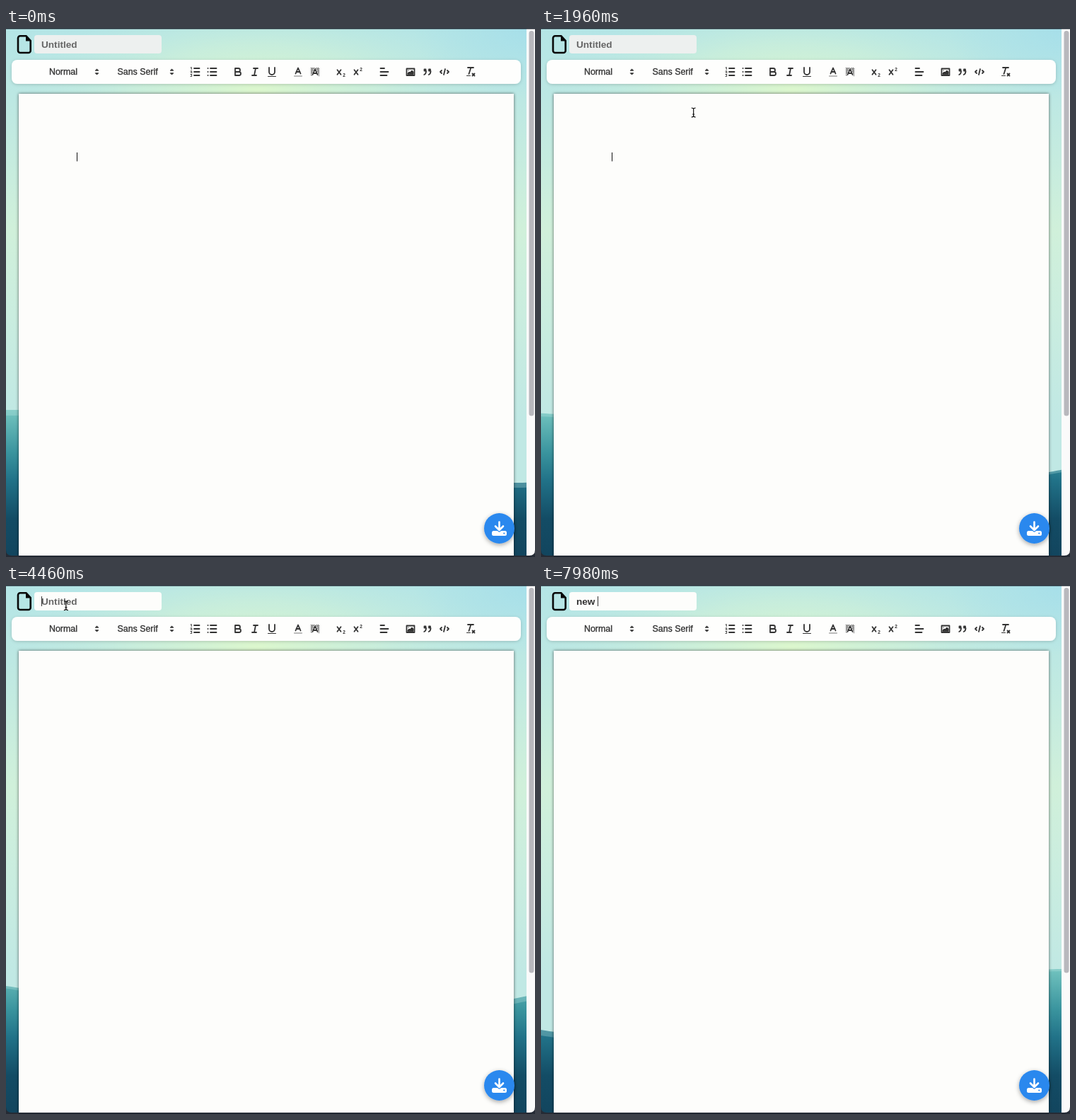
An HTML page that plays this animation: 748x748 px, repeating every 8 s.

```html
<!DOCTYPE html>
<html lang="en">
<head>
<meta charset="utf-8">
<title>Document editor</title>
<style>
  html, body { margin: 0; width: 100%; height: 100%; overflow: hidden; }
  svg { display: block; width: 100vw; height: 100vh; }
  text { font-family: "Liberation Sans", Arial, sans-serif; white-space: pre; }
  .icon { fill: none; stroke: #333; stroke-width: 1.8; stroke-linecap: round; stroke-linejoin: round; }
  .solid { fill: #333; }
  .thin { stroke-width: 1; }
  .label { font-size: 12.4px; fill: #333; stroke: #333; stroke-width: .35; }
  .small { font-size: 6.5px; font-weight: bold; fill: #333; stroke: none; }
  #title { font-size: 13.6px; font-weight: bold; }
</style>
</head>
<body>
<svg viewBox="0 0 748 748">
  <defs>
    <linearGradient id="sky" x2="0" y2="1">
      <stop offset="0" stop-color="#b4e5e6"/>
      <stop offset=".14" stop-color="#bde8e3"/>
      <stop offset=".38" stop-color="#d0f0da"/>
      <stop offset=".54" stop-color="#caeddf"/>
      <stop offset=".74" stop-color="#c0e8e4"/>
    </linearGradient>
    <radialGradient id="glow">
      <stop offset="0" stop-color="#dcf7cd"/>
      <stop offset=".5" stop-color="#d2f2d6" stop-opacity=".6"/>
      <stop offset="1" stop-color="#c0eae0" stop-opacity="0"/>
    </radialGradient>
    <radialGradient id="corner">
      <stop offset="0" stop-color="#a6dfea"/>
      <stop offset="1" stop-color="#a9e0e8" stop-opacity="0"/>
    </radialGradient>
    <linearGradient id="sea" gradientUnits="userSpaceOnUse" x1="0" y1="540" x2="0" y2="748">
      <stop offset="0" stop-color="#74c5c0"/>
      <stop offset=".29" stop-color="#3a949e"/>
      <stop offset=".48" stop-color="#217288"/>
      <stop offset=".74" stop-color="#134c65"/>
      <stop offset="1" stop-color="#12455e"/>
    </linearGradient>
    <pattern id="hatch" width="2" height="2" patternUnits="userSpaceOnUse">
      <path d="M0 0h1v1H0zM1 1h1v1H1z" fill="#333"/>
    </pattern>
    <filter id="pageShadow" x="-5%" y="-5%" width="110%" height="110%">
      <feDropShadow dx="0" dy="0" stdDeviation="2" flood-opacity=".6"/>
    </filter>
    <filter id="softShadow" x="-30%" y="-30%" width="160%" height="170%">
      <feDropShadow dx="0" dy="1" stdDeviation="2" flood-opacity=".18"/>
    </filter>
    <filter id="buttonShadow" x="-40%" y="-40%" width="180%" height="180%">
      <feDropShadow dx="0" dy="2" stdDeviation="3" flood-opacity=".35"/>
    </filter>
  </defs>

  <rect width="748" height="748" fill="url(#sky)"/>
  <ellipse cx="355" cy="88" rx="340" ry="130" fill="url(#glow)"/>
  <ellipse cx="745" cy="0" rx="170" ry="100" fill="url(#corner)"/>
  <g id="waves" fill="url(#sea)"></g>

  <rect x="18" y="93" width="700" height="680" fill="#fdfdfb" filter="url(#pageShadow)"/>
  <path id="pageCaret" d="M100.5 176v12.5" stroke="#111"/>

  <path d="M20 11.3h8.5l6.2 6.7v14a3 3 0 0 1-3 3H20a3 3 0 0 1-3-3V14.3a3 3 0 0 1 3-3z" fill="none" stroke="#080808" stroke-width="2.6"/>
  <path d="M28 11v7.5h7z" fill="#080808"/>
  <rect id="field" x="40" y="10" width="180" height="26" rx="4"/>
  <text id="title" x="50" y="27.5"></text>
  <path id="titleCaret" d="M0 16v14" stroke="#333"/>

  <rect x="8" y="45" width="720" height="34" rx="8" fill="#fefefd" filter="url(#softShadow)"/>
  <text class="label" x="61" y="66.3">Normal</text>
  <text class="label" x="157.5" y="66.3">Sans Serif</text>
  <g id="toolbar"></g>

  <circle cx="697.5" cy="707.5" r="21.5" fill="#2b88ee" filter="url(#buttonShadow)"/>
  <rect x="687" y="711" width="21" height="7" rx="2.5" fill="#fff"/>
  <g fill="none" stroke-linecap="round" stroke-linejoin="round">
    <path d="M697.5 698.5v11m-5.5-5 5.5 5.5 5.5-5.5" stroke="#2b88ee" stroke-width="5"/>
    <path d="M697.5 698.5v11m-5.5-5 5.5 5.5 5.5-5.5" stroke="#fff" stroke-width="2.6"/>
  </g>
  <circle cx="704.3" cy="714.6" r="1.1" fill="#2b88ee"/>

  <rect x="736" width="12" height="748" fill="#fafafa"/>
  <rect x="739.5" y="4" width="7" height="544.5" rx="3.5" fill="#b8b8bd"/>

  <path id="beam" d="M-3-6.5q3 0 3 2v9q0 2-3 2M3-6.5q-3 0-3 2v9q0 2 3 2M-1.5 2.5h3" fill="none" stroke="#111" stroke-width="1.2"/>
  <path id="arrow" d="M0 0v15l3.5-3.2 2.4 5.4 2.5-1.1L6 11h4.8z" fill="#080808" stroke="#fff" stroke-width=".8"/>
  <path d="M0 0h748v748H0zM0 1.5V738q0 8 8 8h732q8 0 8-8V1.5z" fill="#252b35" fill-rule="evenodd"/>
</svg>

<script>
const $ = id => document.getElementById(id);
const line = (d, cls = '') => `<path d="${d}" class="${cls}"/>`;

// Icons live on an 18 x 18 grid, centred on the given x.
const letterX = 'M3.5 6.2l5 6.6M8.5 6.2l-5 6.6';
const chevrons = line('M7 11l2 2 2-2zM7 7l2-2 2 2z', 'solid thin');
const icons = [
  [128.5, chevrons],
  [234.5, chevrons],
  [267.5, line('M7.5 4H15M7.5 9H15M7.5 14H15') +
    line('M2.7 3l1-.5v3M2.5 8q2-1 2 .3L2.7 10h2M2.6 12.5h1.8l-1 1.3q1.5.2.8 1.5l-1.7.2', 'thin')],
  [291.5, line('M6.5 4H15M6.5 9H15M6.5 14H15M3 4h.1M3 9h.1M3 14h.1')],
  [328, line('M5 4h4.5a2.5 2.5 0 0 1 0 5H5zM5 9h5.5a2.5 2.5 0 0 1 0 5H5z')],
  [352, line('M7 4h6M5 14h6M8 14l2-10')],
  [376, line('M5 3v6a4 4 0 0 0 8 0V3') + line('M3.5 15.5h11', 'thin')],
  [413, line('M5.5 11.5L9 3.5l3.5 8M6.4 9h5.2') + '<path d="M3.5 15h11" stroke="#777" stroke-width="1"/>'],
  [437, '<rect x="3" y="3" width="12" height="12" fill="url(#hatch)" stroke="none"/>' +
    '<path d="M5.5 13.5L9 5l3.5 8.5z" fill="#fff" stroke="#fff" stroke-width="3"/>' +
    line('M5.5 13L9 5l3.5 8M6.4 11h5.2')],
  [474, line(letterX) + '<text class="small" x="11.2" y="15.5">2</text>'],
  [498, line(letterX) + '<text class="small" x="11.2" y="7.5">2</text>'],
  [535, line('M3.5 4H9M3.5 9h11M3.5 14h9')],
  [572, line('M3.5 4.5h11v9.5h-11z') + line('M5 12v-1l2-2 1 1 3-3 2 2v3zM6 7h.5', 'solid thin')],
  [596, line('M4.5 5.5h2v2h-2zM11 5.5h2v2h-2z', 'solid') + line('M7 8q0 4-2.8 5M13.5 8q0 4-2.8 5')],
  [620, line('M5 7L3 9l2 2M13 7l2 2-2 2M10 5L8 13')],
  [657, line('M5 3h8M6.5 12L9.4 3M11.5 11.5l3 3M14.5 11.5l-3 3') + line('M3.5 14.5h5', 'thin')]
];
$('toolbar').innerHTML = icons.map(([x, art]) =>
  `<g class="icon" transform="translate(${x - 9} 53)">${art}</g>`).join('');

// Smooth curve through [time, value] points.
function curve(points) {
  const slope = i => {
    const a = points[Math.max(i - 1, 0)], b = points[Math.min(i + 1, points.length - 1)];
    return (b[1] - a[1]) / (b[0] - a[0]);
  };
  return t => {
    let i = 0;
    while (i < points.length - 2 && t > points[i + 1][0]) i++;
    const [t0, v0] = points[i], [t1, v1] = points[i + 1];
    const span = t1 - t0, u = Math.min(1, Math.max(0, (t - t0) / span));
    const s = u * u * (3 - 2 * u);
    return v0 + (v1 - v0) * s + span * u * (1 - u) * ((1 - u) * slope(i) - u * slope(i + 1));
  };
}

const waveSpeed = 85;
const shores = [
  {
    x: 0,
    crest: curve([[-1.24, 542], [0, 540], [1.24, 542], [2.66, 549], [4.46, 567], [5.44, 582], [6.74, 608], [7.98, 629], [8.8, 638]]),
    gap: curve([[0, 8], [1.24, 5], [4.46, 3.5], [6.74, 5], [8, 8]])
  },
  {
    x: 718,
    crest: curve([[-1.24, 637], [0, 643], [1.24, 637], [2.66, 617], [4.46, 585], [5.44, 568], [6.74, 551], [7.98, 543.5], [8.8, 543]]),
    gap: curve([[0, 7], [1.24, 2.5], [2.66, 5], [5.44, 8], [6.74, 7], [8, 3]])
  }
];
$('waves').innerHTML = shores.map(() => '<path opacity=".72"/><path/>').join('');
const wavePaths = [...$('waves').children];

function drawWaves(t) {
  shores.forEach(({ x, crest, gap }, i) => {
    for (const layer of [0, 1]) {
      const tops = [0, 6, 12, 18].map(dx =>
        `L${x + dx} ${crest(t + dx / waveSpeed) + layer * gap(t)}`);
      wavePaths[2 * i + layer].setAttribute('d', `M${x} 748${tops.join('')}V748z`);
    }
  });
}

const pointerX = curve([[0.85, 345], [1.24, 319.5], [1.8, 250], [2.4, 112], [2.66, 99], [3.1, 86], [3.4, 85], [7, 85]]);
const pointerY = curve([[0.85, 370], [1.24, 334.5], [1.8, 170], [2.4, -8], [2.66, -8], [3.1, 24], [3.4, 28.5], [7, 28.5]]);
const focusTime = 3.45;
const keyTimes = [6.3, 6.6, 7, 7.5];

const show = (id, on) => $(id).setAttribute('visibility', on ? 'visible' : 'hidden');
const place = (id, x, y) => $(id).setAttribute('transform', `translate(${x} ${y})`);

function drawPointer(t) {
  const x = pointerX(t), y = pointerY(t);
  const visible = t >= 0.85 && t < keyTimes[0];
  const overText = y > 93 || (y > 10 && y < 36 && x > 40 && x < 220);
  place('beam', x, y);
  place('arrow', x, y);
  show('beam', visible && overText);
  show('arrow', visible && !overText);
}

function drawTitle(t) {
  const focused = t >= focusTime;
  const typed = 'new '.slice(0, keyTimes.filter(k => t >= k).length);
  const lastKey = [focusTime, ...keyTimes].filter(k => t >= k).pop();
  $('field').setAttribute('fill', focused ? '#fdfdfb' : '#edf0ef');
  $('title').textContent = typed || 'Untitled';
  $('title').setAttribute('fill', typed ? '#333' : '#666');
  const width = typed ? $('title').getComputedTextLength() : 0;
  place('titleCaret', 50.5 + Math.round(width), 0);
  show('titleCaret', focused && (t - lastKey) % 1 < 0.5);
  show('pageCaret', !focused && (t + 0.4) % 1 < 0.5);
}

function frame(now) {
  const t = now / 1000 % 8;
  drawWaves(t);
  drawPointer(t);
  drawTitle(t);
  requestAnimationFrame(frame);
}
requestAnimationFrame(frame);
</script>
</body>
</html>
```
